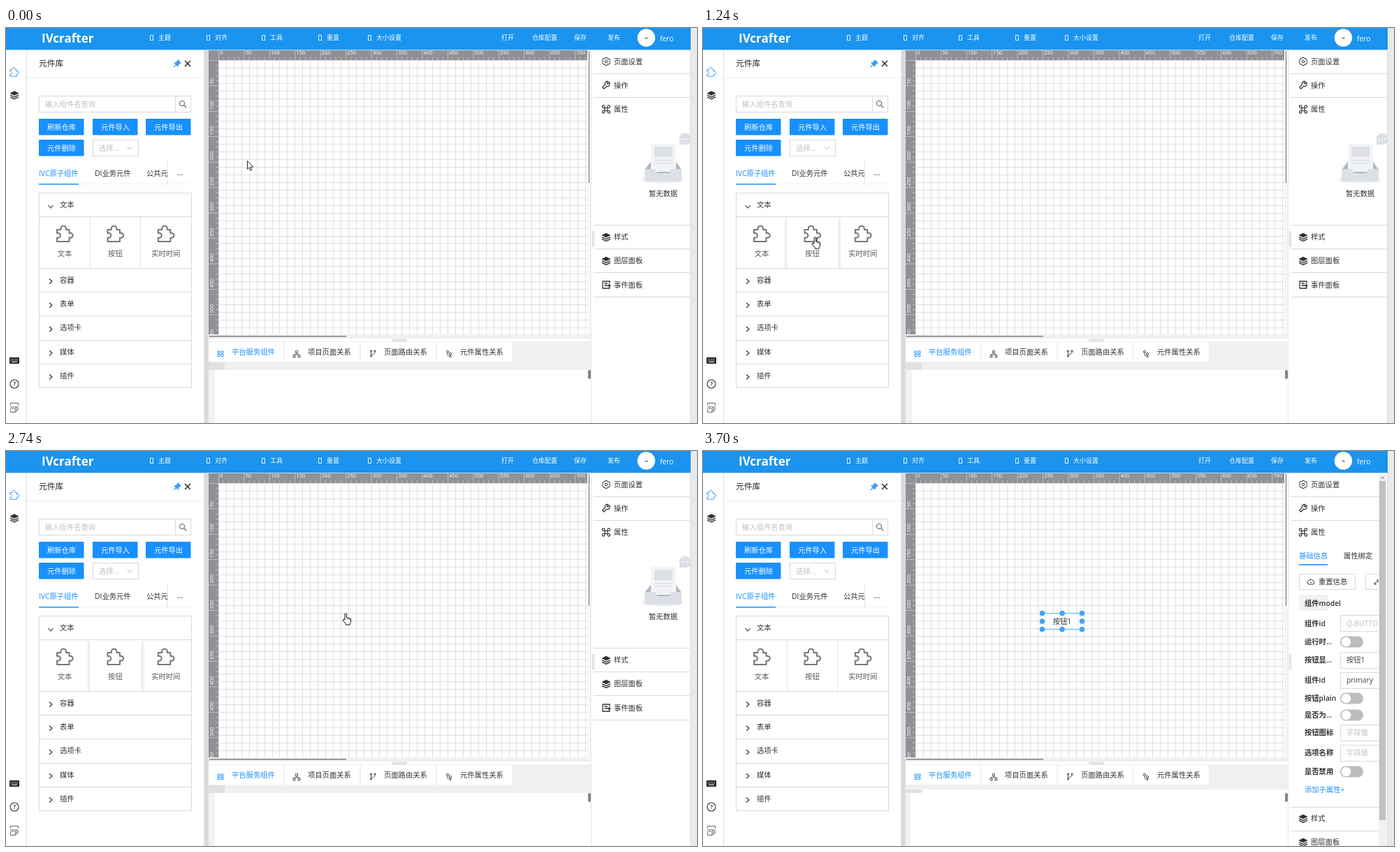
Write an HTML page with a canvas that moves like this. It is 989 by 566 pixels and loops after 3.95 s.

```html
<!DOCTYPE html>
<html lang="zh">
<head>
<meta charset="utf-8">
<title>Page editor</title>
<style>
html, body { margin: 0; width: 100%; height: 100%; overflow: hidden; background: #fff; }
canvas { display: block; }
</style>
</head>
<body>
<canvas id="stage" width="989" height="566"></canvas>
<script>
const g = document.getElementById('stage').getContext('2d');
const LOOP = 3950;
const BLUE = '#1890ff', LINE = '#d9d9d9', INK = '#303030', PALE = '#bfbfbf';
const FACE = '"Open Sans", "Noto Sans CJK SC", "Noto Sans CJK", sans-serif';

// Pointer poses: start time, kind, left, top
const POSES = [
  [0, 'arrow', 345, 190], [150, 'arrow', 283, 199], [300, 'arrow', 240, 219],
  [430, 'arrow', 204, 235], [580, 'arrow', 185, 258], [700, 'hand', 165, 280],
  [850, 'hand', 160, 290], [970, 'hand', 155, 299], [1820, 'stop', 190, 279],
  [1940, 'stop', 276, 239], [2060, 'arrow', 415, 221], [2210, 'arrow', 455, 228],
  [2330, 'arrow', 485, 232], [2480, 'hand', 481, 232], [3010, 'arrow', 530, 233],
  [3150, 'arrow', 640, 305], [3280, 'arrow', 770, 420], [3400, 'hand', 888, 519],
  [3550, 'hand', 937, 553], [3700, 'none', 0, 0]
];
// Dragged card: start time, left, top
const DRAG = [[0], [1820, 132, 255], [1940, 218, 215], [2060, 375, 192],
  [2210, 415, 199], [2330, 445, 203], [2480]];
const at = (keys, t) => keys.filter(k => k[0] <= t).pop();

function rect(x, y, w, h, fill) { g.fillStyle = fill; g.fillRect(x, y, w, h); }
function frame(x, y, w, h, color = LINE) {
  g.strokeStyle = color; g.lineWidth = 1;
  g.strokeRect(x + .5, y + .5, w - 1, h - 1);
}
const hline = (x, y, w, c = LINE) => rect(x, y, w, 1, c);
const vline = (x, y, h, c = LINE) => rect(x, y, 1, h, c);
function text(s, x, y, size = 10.3, color = INK, weight = 400, align = 'left') {
  g.font = `${weight} ${size}px ${FACE}`;
  g.fillStyle = color; g.textAlign = align;
  g.fillText(s, x, y + size * .37);
}
const mid = (s, x, y, size, color, weight) => text(s, x, y, size, color, weight, 'center');
function path(d, x, y, color, width = 1, scale = 1, fill) {
  g.save(); g.translate(x, y); g.scale(scale, scale);
  const p = new Path2D(d);
  g.lineJoin = 'round';
  if (fill) { g.fillStyle = fill; g.fill(p); }
  if (color) { g.strokeStyle = color; g.lineWidth = width / scale; g.stroke(p); }
  g.restore();
}
function disc(x, y, r, fill, stroke, width = 1) {
  g.beginPath(); g.arc(x, y, r, 0, 7);
  if (fill) { g.fillStyle = fill; g.fill(); }
  if (stroke) { g.strokeStyle = stroke; g.lineWidth = width; g.stroke(); }
}
function pill(x, y, w, h, fill, r = h / 2) {
  g.beginPath(); g.roundRect(x, y, w, h, r); g.fillStyle = fill; g.fill();
}
function clip(x, y, w, h) {
  g.save();
  g.beginPath(); g.rect(x, y, w, h); g.clip();
}

const PUZZLE = 'M-11-6H-5.5C-7-13.5 3.5-13.5 2-6H6.5V-1C13.5-2.5 13.5 7 6.5 5.5V11H-11V5.5C-4.5 7-4.5-2.5-11-1Z';
const HAND = 'M4 10V2a1.3 1.3 0 0 1 2.6 0V7q1-.8 2 .2 1.2-.6 2 .4 1.6-.4 1.9 1V12q0 2-1.2 3.5V17H5.2V15.6L1.2 10.8q-.6-1.6 1-1.6z';
const ARROW = 'M.5.5V12.2L3.2 9.7 5 14 6.9 13.2 5.1 9.1H8.7Z';
const puzzle = (x, y, color = '#777', width = 2, s = 1) => path(PUZZLE, x, y, color, width, s);
const chevron = (x, y, down) => path(down ? 'M-3.5-2 0 2 3.5-2' : 'M-2-3.5 2 0-2 3.5', x, y, INK, 1.1);

const icons = {
  layers(x, y) {
    path('M0-5.5 6-2.5 0 .5-6-2.5Z', x, y, INK, .6, 1, INK);
    path('M-6 .2 0 3.2 6 .2M-6 2.8 0 5.8 6 2.8', x, y, INK, 1.3);
  },
  gear(x, y) {
    path('M-1.5-5.5h3l.6 1.8 2-.5 1.6 2.7L4.4 0l1.3 1.5-1.6 2.7-2-.5-.6 1.8h-3l-.6-1.8-2 .5-1.6-2.7L-4.4 0l-1.3-1.5 1.6-2.7 2 .5Z', x, y, INK);
    disc(x, y, 1.8, null, INK);
  },
  wrench(x, y) {
    path('M4.8-4.2 2.4-2 1-3.3 3-5.4C0-6.4-2.6-3.6-1.5-1L-5.3 3.2-3.3 5.2.8 1.3C3.5 2.6 6.3-.8 4.8-4.2Z', x, y, INK, 1.2);
  },
  command(x, y) {
    path('M-2-2H2V2H-2ZM-2-2V-4A1.8 1.8 0 1 0-4-2H-2M2-2H4A1.8 1.8 0 1 0 2-4V-2M2 2V4A1.8 1.8 0 1 0 4 2H2M-2 2H-4A1.8 1.8 0 1 0-2 4V2', x, y, INK, 1.2);
  },
  event(x, y) {
    path('M5-2V-5H-5V5H5V3M-2.5-2H2M-2.5 1H6M3.5-1 6 1 3.5 3', x, y, INK, 1.3);
  }
};
function section(icon, label, y) {
  icons[icon](859, y);
  text(label, 870, y);
}

function header() {
  rect(0, 0, 980, 31, '#1a94ee');
  hline(0, 31, 980, '#b9daf3');
  text('IVcrafter', 51, 15, 17, '#fff', 700);
  [['主题', 206], ['对齐', 287], ['工具', 366], ['重置', 447], ['大小设置', 518]].forEach(([s, x]) => {
    frame(x, 10, 5, 8, '#e4f2fd');
    text(s, x + 12, 14, 9, '#fff');
  });
  [['打开', 709], ['仓库配置', 753], ['保存', 813], ['发布', 861]].forEach(([s, x]) => text(s, x, 14, 9, '#fff'));
  disc(916.4, 14, 12.7, '#fff');
  rect(914.5, 14, 4, 1, '#333');
  text('fero', 936, 15, 10.3, '#fff');
}

function sidebar() {
  vline(29, 32, 534, '#dedede');
  puzzle(12, 63, '#3f9cf5', 1, .56);
  icons.layers(12, 96);
  pill(5, 472, 14, 9, '#222', 1);
  for (let i = 0; i < 5; i++) {
    rect(7 + i * 2.2, 474, 1, 1, '#fff');
    rect(7 + i * 2.2, 476, 1, 1, '#fff');
  }
  rect(8, 478, 8, 1, '#fff');
  disc(12, 510, 6, null, INK, 1.1);
  mid('?', 12, 510, 9, INK, 600);
  path('M-5.5-3V-6.5H5.5V-3M-5.5 3V6.5H1L5.5 3M1 6.5V3H5.5', 12, 544, '#666');
  mid('JSON', 12, 544, 4.8, '#444', 600);
}

function cell(x, y, label) {
  puzzle(x + 36, y + 24);
  mid(label, x + 36, y + 52, 10.3, '#555');
}

function library(hover) {
  const edge = g.createLinearGradient(283, 0, 290, 0);
  edge.addColorStop(0, '#e6e8ec'); edge.addColorStop(.4, '#d3d7de'); edge.addColorStop(1, '#dcdfe4');
  rect(283, 32, 7, 534, edge);
  text('元件库', 47, 51, 11.7, '#222');
  path('M1-5 5-1 3.5-.5 1.5 1.5 1 4-4-1-1.5-1.5.5-3.5ZM-1.5 1.5-5 5', 245, 51, '#3f9cf5', 1.2, 1, '#3f9cf5');
  path('M-4-4 4 4M4-4-4 4', 260, 51, '#222', 1.4);
  hline(30, 71, 253, '#ebebeb');

  frame(47, 97, 218, 24);
  vline(242, 98, 22);
  text('输入组件名查询', 56, 109, 10.3, PALE);
  disc(252, 108, 3.6, null, '#555');
  path('M0 0 3.5 3.5', 254.7, 110.7, '#555', 1.2);
  [['刷新仓库', 47, 130], ['元件导入', 124, 130], ['元件导出', 200, 130], ['元件删除', 47, 160]].forEach(([s, x, y]) => {
    pill(x, y, 64.5, 23.5, BLUE, 1);
    mid(s, x + 32.5, y + 12, 10.3, '#fff');
  });
  frame(124, 160, 66, 24);
  text('选择...', 133, 172, 10.3, PALE);
  path('M-3.5-2 0 2 3.5-2', 177, 172, PALE);

  hline(47, 223, 218, '#efefef');
  text('IVC原子组件', 47, 208, 10.3, BLUE);
  text('DI业务元件', 127, 208);
  text('公共元', 201, 208);
  vline(231, 191, 33, '#e2e2e2');
  mid('...', 249, 207, 11, INK);
  rect(47, 223, 57, 1.5, BLUE);

  frame(47, 236, 219, 280);
  [270, 344, 378, 412, 447, 481].forEach(y => hline(47, y, 219));
  chevron(64, 256, true);
  text('文本', 77, 253);
  ['容器', '表单', '选项卡', '媒体', '插件'].forEach((s, i) => {
    const y = 361 + i * 34.25;
    chevron(64, y + 2);
    text(s, 77, y);
  });
  vline(120, 271, 73, '#e4e4e4');
  vline(192, 271, 73, '#e4e4e4');
  if (hover) {
    clip(115, 271, 84, 73);
    g.shadowColor = 'rgba(0,0,0,.22)'; g.shadowBlur = 6; g.shadowOffsetY = 2;
    rect(120, 271, 74, 78, '#fff');
    g.restore();
  }
  ['文本', '按钮', '实时时间'].forEach((s, i) => cell(48 + i * 72.4, 271, s));
}

function workspace() {
  const unit = .729;
  rect(290, 32, 543, 14, '#909196');
  rect(290, 32, 14, 407, '#909196');
  clip(304, 46, 528, 393);
  for (let k = 0; k < 50; k++) {
    const d = Math.round(k * 15 * unit);
    vline(304 + d, 46, 393, '#dfdfdf');
    hline(304, 46 + d, 528, '#dfdfdf');
  }
  g.restore();
  clip(290, 32, 542, 407);
  for (let v = 0; v <= 720; v += 10) {
    const d = v * unit, big = v % 50 === 0, n = big ? 14 : 4;
    rect(304 + d, 46 - n, .7, n, '#d2d3d6');
    if (46 + d < 439) rect(304 - n, 46 + d, n, .7, '#d2d3d6');
    if (!big) continue;
    text(String(v), 306 + d, 35.5, 7.5, '#fff');
    if (!v) continue;
    g.save(); g.translate(294, 44 + d); g.rotate(-Math.PI / 2);
    text(String(v), 0, 0, 7.5, '#fff');
    g.restore();
  }
  g.restore();
  rect(832, 32, 5, 412, '#f7f7f7');
  rect(834, 33, 1, 189, '#6c6c6c');
  rect(290, 439, 546, 5, '#f0f0f0');
  rect(291, 441, 196, 1.5, '#808080');
}

function dock(t) {
  const open = t >= 2860, plain = open && t < 3150;
  const end = open && !plain ? 485 : 490;
  rect(290, 444, 547, 122, '#fff');
  if (!plain) {
    rect(290, 449, 547, end - 449, '#f0f0f0');
    rect(290, end, open ? 7 : 9, 566 - end, '#f2f2f2');
    [290, 399, 508, 617].forEach(x => rect(x, 450, 107, 28, '#fff'));
  }
  hline(290, 444, 546, '#ececec');
  const top = end === 485 ? 485 : 479;
  rect(290, top, 23, 490 - top, '#e0e2e2');
  hline(552, 446, 22, '#ccc');
  hline(552, 448, 22, '#ccc');
  path('M-4-3H-1V0H-4ZM-4 1.5H-1V4.5H-4ZM1-3H4V0H1ZM1 1.5H4V4.5H1Z', 307, 466, BLUE, .9);
  path('M-1.5-4.5H1.5V-1.5H-1.5ZM0-1.5V1M-3.5 2V.7H3.5V2M-5 2H-2V5H-5ZM2 2H5V5H2Z', 416, 467, '#444', .9);
  path('M-2.5-2V4M-2.5 2Q3 2 3-2M-3.5-4H-1.5V-2H-3.5ZM2-4H4V-2H2ZM-3.5 3.5H-1.5V5H-3.5Z', 525, 466, '#444', .9);
  disc(632, 464, 1.6, null, '#444'); disc(636, 467, 1.6, null, '#444'); disc(636, 470.5, 1.2, null, '#444');
  path('M0 0V3.5H2', 632, 466, '#444', .8);
  text('平台服务组件', 323, 464, 10.3, BLUE);
  text('项目页面关系', 432, 464);
  text('页面路由关系', 541, 464);
  text('元件属性关系', 650, 464);
  pill(833, 490, 4, 13, '#858585');
}

function emptyState() {
  g.beginPath(); g.ellipse(940, 217, 31, 6, 0, 0, 7); g.fillStyle = '#f2f3f4'; g.fill();
  path('M914 203 925 189H957L967 203V210H914Z', 0, 0, null, 1, 1, '#aeb8c2');
  rect(923, 166, 36, 40, '#f3f4f6');
  rect(928, 170, 26, 15, '#dce0e6');
  rect(928, 189, 26, 1.5, '#dce0e6');
  rect(928, 193, 26, 1.5, '#dce0e6');
  path('M914 202H927Q930 202 930 205 931 208 934 208H948Q951 208 951 205 951 202 954 202H967V217Q967 220 964 220H917Q914 220 914 217Z', 0, 0, null, 1, 1, '#dce0e6');
  clip(841, 140, 138, 100);
  disc(972, 159, 8.5, '#dce0e6');
  path('M964 163 964 168 970 166Z', 0, 0, null, 1, 1, '#dce0e6');
  [968, 972, 976].forEach(x => disc(x, 159.5, 1, '#fff'));
  g.restore();
  mid('暂无数据', 940.5, 237);
}

function form(t) {
  const ink = t < 3010 ? 13 : t < 3150 ? 39 : 41;
  text('基础信息', 853, 150, 10.3, BLUE);
  text('属性绑定', 917, 150);
  rect(853, 162, ink, 1.6, BLUE);
  frame(853, 176, 81, 23);
  path('M-3 3.5A2.6 2.6 0 0 1-3-1.5 3.2 3.2 0 0 1 3-1.5 2.6 2.6 0 0 1 3 3.5ZM-1 1.5 0 .5 1 1.5', 870, 187.5, INK);
  text('重置信息', 881, 187.5);
  frame(948, 176, 30, 23);
  path('M-2 2 2-2M0-3H3V0M-3 0V3H0', 964, 188, INK);
  if (t >= 3150) rect(853, 206, 42, 23, '#f2f2f2');
  const rows = [['组件model', 218], ['组件id', 247, 'Q-BUTTON', PALE], ['运行时...', 273, 1],
    ['按钮显...', 299.5, '按钮1', '#444'], ['组件id', 328.5, 'primary', '#444'], ['按钮plain', 354, 1],
    ['是否为...', 378, 1], ['按钮图标', 403.5, '字段值', PALE], ['选项名称', 432.5, '字段值', PALE], ['是否禁用', 459, 1]];
  rows.forEach(([label, y, value, color]) => {
    text(label, 861, y, 10.3, '#333', 600);
    if (value === 1) {
      pill(912, y - 7.5, 33, 16, '#bdbdbd');
      disc(920.5, y + .5, 6.8, '#fff');
    } else if (value) {
      frame(912, Math.round(y - 12), 66, 24);
      text(value, 921, y, 10.3, color);
    }
  });
  text('添加子属性+', 861, 485, 10.3, BLUE);
}

function inspector(t, open) {
  rect(837, 32, 142, 534, '#fff');
  vline(837, 32, 534, '#e6e6e6');
  vline(839, 291, 23, '#d0d0d0');
  vline(841, 291, 23, '#d0d0d0');
  clip(838, 32, open ? 129 : 141, 534);
  section('gear', '页面设置', 48);
  section('wrench', '操作', 82);
  section('command', '属性', 116.5);
  (open ? [65, 99, 510, 544] : [65, 99, 282, 316, 350, 385]).forEach(y => hline(841, y, 138));
  if (open) form(t); else emptyState();
  const y = open ? 526.5 : 299.5;
  section('layers', '样式', y);
  section('layers', '图层面板', y + 34);
  section('event', '事件面板', y + 68.5);
  g.restore();
  if (open) {
    rect(967, 33, 11, 533, '#f1f1f1');
    rect(968, 43, 9, 486, '#c1c1c1');
    path('M-3 1.5H3L0-1.5Z', 972.5, 38, null, 1, 1, '#a0a0a0');
  }
  rect(980, 0, 9, 566, '#e9e9e9');
  vline(979, 32, 534, '#dcdcdc');
}

function selection() {
  rect(485, 232, 57, 24, '#fff');
  frame(490, 233, 47, 22, '#eee');
  hline(485, 232, 57, '#6bb6f8');
  hline(485, 255, 57, '#6bb6f8');
  mid('按钮1', 514, 244);
  for (const x of [485.5, 514, 542.5])
    for (const y of [232.5, 244, 255.5])
      if (x !== 514 || y !== 244) disc(x, y, 3.8, '#40a4fa');
}

function card(x, y) {
  g.save();
  g.globalAlpha = .8;
  rect(x, y, 72, 73, '#fff');
  g.globalAlpha = .7;
  cell(x, y, '按钮');
  g.restore();
}

function pointer(kind, x, y) {
  if (kind === 'arrow') path(ARROW, x, y, '#111', .9, 1, '#fff');
  if (kind === 'hand') {
    path(HAND, x, y, '#111', 1, 1, '#fff');
    path('M8.6 7.2V9.6M10.6 7.7V9.8', x, y, '#111', .8);
  }
  if (kind === 'stop') {
    disc(x, y, 5, '#fff', '#d40f18', 2);
    path('M-3.4-3.4 3.4 3.4', x, y, '#d40f18', 2);
  }
}

function draw(t) {
  const open = t >= 2860;
  rect(0, 0, 989, 566, '#fff');
  header();
  sidebar();
  library(t >= 700 && t < 3150);
  workspace();
  dock(t);
  inspector(t, open);
  if (open) selection();
  const [, dx, dy] = at(DRAG, t);
  if (dx) card(dx, dy);
  const [, kind, x, y] = at(POSES, t);
  pointer(kind, x, y);
}

function tick(now) {
  draw(now % LOOP);
  requestAnimationFrame(tick);
}
draw(0);
requestAnimationFrame(tick);
</script>
</body>
</html>
```
